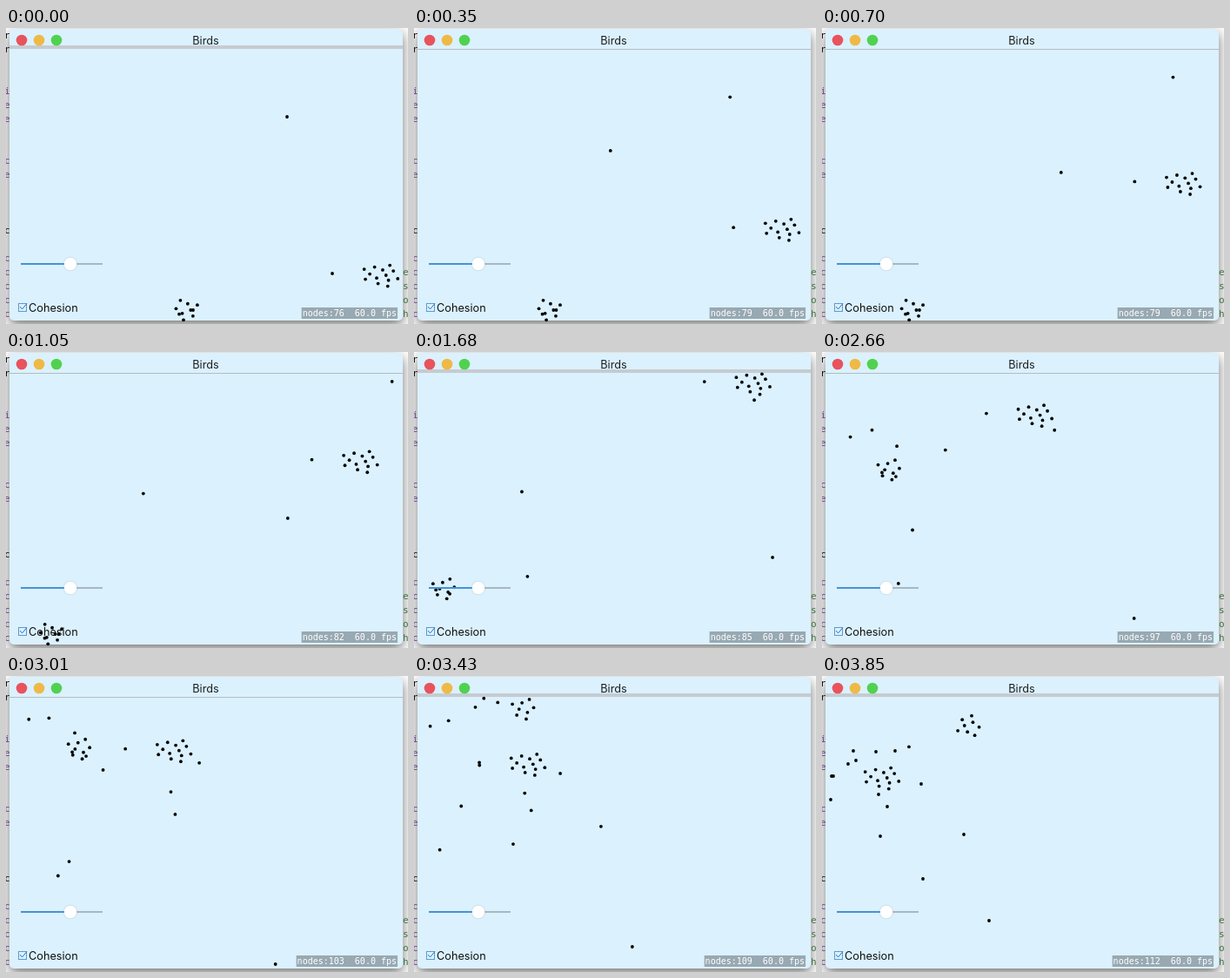
These frames come from a looping animation (462 px wide and 340 px high, 3.92 s). An HTML page with a canvas:

```html
<!DOCTYPE html>
<html>
<head>
<meta charset="utf-8">
<style>
  html, body { margin: 0; width: 100%; height: 100%; overflow: hidden; background: #fff; }
  canvas { display: block; }
</style>
</head>
<body>
<canvas id="stage" width="462" height="340"></canvas>
<script>
const ctx = document.getElementById('stage').getContext('2d');
const LOOP = 3920, STEP = 70, END = LOOP - STEP;
const WALL = { left: 5, right: 454, top: 25, bottom: 336 };
const SKY = '#dbf1fd';
const UI_FONT = '12.7px Inter, sans-serif';
const MONO = '"DejaVu Sans Mono", monospace';
const GOLDEN_ANGLE = 2.4;

// Routes are waypoints in unfolded space: beyond a wall they are mirrored back in.
const upAndLeft = [[432, 284], [395, 35], [70, 117]];
const straggler = upAndLeft.map(([x, y]) => [x - 57, y - 2]);
const aroundCorner = [[208, 324], [45, 324], [-29, 268], [-58, 195], [-74, 81]];

const FLOCKS = [
  { count: 13, route: upAndLeft, rx: 24, ry: 14 },
  { count: 1, route: straggler, rx: 0, ry: 0 },
  { count: 8, route: [...aroundCorner, [-158, -7]], rx: 17, ry: 13 },
  { count: 2, route: [...aroundCorner, [-81, -36]], rx: 14, ry: 8 }
];

// Lone birds in order of appearance.
const LONERS = [
  [[323, 102], [447, 32], [539, -17], [794, -74]],
  [[224, 140], [716, 391]],
  [[162, 148], [36, 586]],
  [[168, 168], [39, 146], [11, -65]],
  [[80, 205], [30, -51]],
  [[100, 192], [62, -37]],
  [[158, 174], [43, 239], [10, 142]],
  [[158, 115], [39, 97]],
  [[236, 132], [65, 136]],
  [[209, 160], [75, 150]],
  [[150, 200], [67, 184]],
  [[231, 170], [163, 182]],
  [[150, 200], [116, 233]]
];

// Newcomers arrive ever more quickly.
const birthTime = i => i && 858 * (i - .8) ** .58;

// Point at constant speed along a route, k from 0 to 1.
function along(route, k) {
  const legs = route.slice(1).map(([x, y], i) => Math.hypot(x - route[i][0], y - route[i][1]));
  let rest = k * legs.reduce((sum, leg) => sum + leg, 0), i = 0;
  while (i < legs.length - 1 && rest > legs[i]) rest -= legs[i++];
  return route[i].map((v, axis) => v + (route[i + 1][axis] - v) * rest / legs[i]);
}

const fold = (v, low, high) =>
  v < low ? 2 * low - v : v > high ? 2 * high - v : v;

function disc(x, y, r, color) {
  ctx.fillStyle = color;
  ctx.beginPath();
  ctx.arc(x, y, r, 0, 2 * Math.PI);
  ctx.fill();
}

function rect(x, y, w, h, color) {
  ctx.fillStyle = color;
  ctx.fillRect(x, y, w, h);
}

function label(text, x, y, font, color, align = 'left') {
  ctx.font = font;
  ctx.fillStyle = color;
  ctx.textAlign = align;
  ctx.fillText(text, x, y);
}

function shadow(color, blur, dy) {
  ctx.shadowColor = color;
  ctx.shadowBlur = blur;
  ctx.shadowOffsetY = dy;
}

function bird(x, y) {
  disc(fold(x, WALL.left, WALL.right), fold(y, WALL.top, WALL.bottom), 1.9, '#000');
}

function drawFlock({ count, route, rx, ry }, t) {
  const [x, y] = along(route, t / END);
  for (let i = 0; i < count; i++) {
    const r = Math.sqrt((i + .5) / count), angle = i * GOLDEN_ANGLE;
    bird(x + rx * r * Math.cos(angle), y + ry * r * Math.sin(angle));
  }
}

function drawCodeBehind() {
  ctx.save();
  ctx.beginPath();
  ctx.rect(0, 0, 4, 340);
  ctx.rect(456, 0, 6, 340);
  ctx.clip();
  [...'rr  iee  ce   c cccccc'].slice(0, 21).forEach((c, i) =>
    label(c, -2, 12 + 16 * i, '11px ' + MONO, i < 2 || i === 14 ? '#111' : '#6b3f80'));
  [...'esoh'].forEach((c, i) => label(c, 456, 284 + 16 * i, '11px ' + MONO, '#3d7440'));
  ctx.restore();
}

function drawWindow(t) {
  rect(0, 0, 462, 340, '#fff');
  shadow('rgba(0,0,0,.55)', 14, 5);
  ctx.fillStyle = SKY;
  ctx.beginPath();
  ctx.roundRect(4, 1, 452, 335, 5);
  ctx.fill();
  shadow('transparent', 0, 0);
  drawCodeBehind();

  // The title bar's edge alternates between a thick and a thin rule.
  const thick = Math.floor((t + 1050) / 1120) % 2 === 0;
  if (thick) rect(4, 20, 452, 4, '#c6cbd0');
  else rect(4, 24, 452, 1, '#b3bcc6');

  ['#e8535c', '#efb945', '#50d250'].forEach((color, i) => disc(18 + 20 * i, 14, 6.3, color));
  label('Birds', 229.5, 19, UI_FONT, '#1c1f22', 'center');
}

function drawControls(nodes) {
  rect(17, 270, 57, 2, '#4792d6');
  rect(74, 270, 37, 2, '#a9b8c2');
  shadow('rgba(0,0,0,.2)', 2, 0);
  disc(74, 271, 7.3, '#fff');
  shadow('transparent', 0, 0);

  ctx.strokeStyle = '#5b9bd3';
  ctx.lineWidth = 1;
  ctx.strokeRect(14.5, 316.5, 9, 9);
  ctx.strokeStyle = '#3673b0';
  ctx.stroke(new Path2D('M16 320l2.5 3 5.5-6.5'));
  label('Cohesion', 26, 326, UI_FONT, '#111');

  const text = `nodes:${nodes}  60.0 fps`;
  const width = text.length * 6.02 + 2;
  rect(450 - width, 321, width, 13, '#98a9b3');
  label(text, 449, 331, '10px ' + MONO, '#fff', 'right');
}

function draw(t) {
  drawWindow(t);
  FLOCKS.forEach(flock => drawFlock(flock, t));

  const alive = LONERS.filter((_, i) => t >= birthTime(i));
  alive.forEach((route, i) => {
    const born = birthTime(i);
    bird(...along(route, (t - born) / (END - born)));
  });
  drawControls(73 + 3 * alive.length);
}

function tick(now) {
  draw(Math.floor(now % LOOP / STEP) * STEP);
  requestAnimationFrame(tick);
}
requestAnimationFrame(tick);
</script>
</body>
</html>
```
